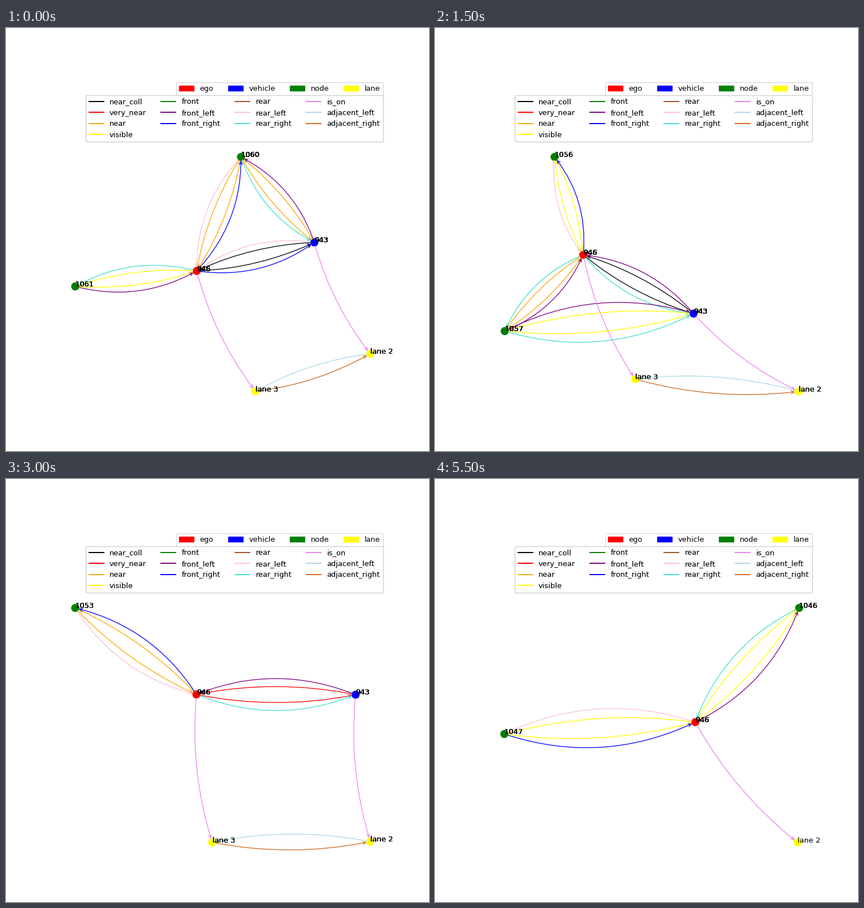
Recreate the animation shown at these times as a matplotlib script. Size 748x748 px, loop 6 s.

```python
import matplotlib.pyplot as plt
from matplotlib.animation import FuncAnimation
from matplotlib.lines import Line2D
from matplotlib.patches import FancyArrowPatch, Patch

SIZE = 748
plt.rcParams["font.family"] = "DejaVu Sans"

NODE_COLORS = {"ego": "red", "vehicle": "blue", "node": "green", "lane": "yellow"}
EDGE_COLORS = {
    "near_coll": "black", "very_near": "red", "near": "orange", "visible": "yellow",
    "front": "green", "front_left": "purple", "front_right": "blue",
    "rear": "sienna", "rear_left": "pink", "rear_right": "turquoise",
    "is_on": "violet", "adjacent_left": "lightblue", "adjacent_right": "chocolate",
}
KINDS = {"ego": "ego", "car": "vehicle", "a": "node", "b": "node",
         "lane 2": "lane", "lane 3": "lane", "lane": "lane"}

# Node positions in pixels, one layout per graph structure.
LAYOUTS = {
    "corner": {"a": (415.5, 228.1), "car": (545.2, 379.2), "ego": (337.2, 429.6),
               "b": (122.4, 457), "lane 2": (644.1, 576), "lane 3": (441.2, 642.6)},
    "triangle": {"a": (169.8, 227.9), "car": (477.3, 345.6), "ego": (122.8, 435.3),
                 "lane 2": (643.7, 553.4), "lane 3": (289.1, 642.7)},
    "hub": {"a": (211.4, 228), "ego": (262.1, 401.2), "car": (457.2, 505),
            "b": (123.3, 536), "lane 3": (354.1, 621), "lane 2": (643.1, 642.6)},
    "chain": {"a": (122.4, 228.1), "ego": (336.7, 381), "car": (618.2, 381.4),
              "lane 3": (364.7, 642.6), "lane 2": (644.1, 641.2)},
    "fork": {"a": (643.9, 228), "ego": (460.2, 430), "b": (122.6, 451), "lane": (641.1, 642.6)},
    "line": {"a": (623.6, 227.8), "ego": (404.9, 435.5), "lane": (143.1, 642.6)},
}

# Relation of the first node to the second, then the way back.
LEFT, RIGHT = ("rear_left", "front_right"), ("front_left", "rear_right")
FACING, BACK = ("front", "rear"), ("rear", "front")


def flip(pair):
    return pair[::-1]


# Each scene: layout, labels, links (from, to, distance, relations).
SCENES = [
    ("corner", {"a": "1060", "b": "1061"}, [
        ("a", "ego", "near", LEFT), ("car", "a", "near", RIGHT),
        ("car", "ego", "near_coll", LEFT), ("b", "ego", "visible", RIGHT)]),
    ("triangle", {"a": "1059"}, [
        ("a", "ego", "very_near", RIGHT), ("car", "a", "near", RIGHT),
        ("car", "ego", "near_coll", RIGHT)]),
    ("triangle", {"a": "1058"}, [
        ("a", "ego", "very_near", RIGHT), ("car", "a", "near", RIGHT),
        ("car", "ego", "near_coll", RIGHT)]),
    ("hub", {"a": "1056", "b": "1057"}, [
        ("a", "ego", "visible", LEFT), ("b", "ego", "near", RIGHT),
        ("car", "ego", "near_coll", RIGHT), ("car", "b", "visible", RIGHT)]),
    ("triangle", {"a": "1055"}, [
        ("a", "ego", "near", LEFT), ("car", "a", "visible", RIGHT),
        ("car", "ego", "near_coll", RIGHT)]),
    ("chain", {"a": "1054"}, [
        ("a", "ego", "very_near", LEFT), ("car", "ego", "very_near", RIGHT)]),
    ("chain", {"a": "1053"}, [
        ("a", "ego", "near", LEFT), ("car", "ego", "very_near", RIGHT)]),
    ("fork", {"a": "1051", "b": "1052", "lane": "lane 3"}, [
        ("a", "ego", "visible", BACK), ("b", "ego", "visible", FACING)]),
    ("fork", {"a": "1050", "b": "1051", "lane": "lane 3"}, [
        ("a", "ego", "visible", BACK), ("b", "ego", "visible", FACING)]),
    ("line", {"a": "1049", "lane": "lane 3"}, [
        ("a", "ego", "very_near", flip(LEFT))]),
    ("fork", {"a": "1047", "b": "1048", "lane": "lane 3"}, [
        ("a", "ego", "visible", flip(RIGHT)), ("b", "ego", "visible", flip(LEFT))]),
    ("fork", {"a": "1046", "b": "1047", "lane": "lane 2"}, [
        ("a", "ego", "visible", flip(RIGHT)), ("b", "ego", "visible", flip(LEFT))]),
]

fig = plt.figure(figsize=(8, 8), dpi=SIZE / 8, facecolor="white")
ax = fig.add_axes([0, 0, 1, 1])
ax.set(xlim=(0, SIZE), ylim=(SIZE, 0))
ax.axis("off")


def add_legend(handles, top):
    legend = ax.legend(handles=handles, ncol=4, loc="upper right", fontsize=10,
                       bbox_to_anchor=(0.9, top), bbox_transform=fig.transFigure)
    legend.set_zorder(5)
    ax.add_artist(legend)


add_legend([Patch(color=c, label=k) for k, c in NODE_COLORS.items()], 0.88)
add_legend([Line2D([], [], color=c, label=k) for k, c in EDGE_COLORS.items()], 0.8492)

drawn = []


def edges_of(layout, links):
    """Yield (start, end, relation, curvature) for every arrow."""
    for start, end, distance, (relation, inverse) in links:
        yield start, end, distance, 0.1
        yield end, start, distance, 0.1
        yield start, end, relation, 0.2
        yield end, start, inverse, 0.2
    if "lane" in layout:
        yield "ego", "lane", "is_on", 0.1
    else:
        yield "ego", "lane 3", "is_on", 0.1
        yield "car", "lane 2", "is_on", 0.1
        yield "lane 2", "lane 3", "adjacent_left", 0.1
        yield "lane 3", "lane 2", "adjacent_right", 0.1


def update(index):
    while drawn:
        drawn.pop().remove()
    name, labels, links = SCENES[index]
    layout = LAYOUTS[name]
    labels = {"ego": "946", "car": "943", **labels}

    xs, ys = zip(*layout.values())
    colors = [NODE_COLORS[KINDS[role]] for role in layout]
    drawn.append(ax.scatter(xs, ys, s=100, c=colors, zorder=2))

    for start, end, relation, rad in edges_of(layout, links):
        arrow = FancyArrowPatch(
            layout[start], layout[end], arrowstyle="->", mutation_scale=10,
            connectionstyle=f"arc3,rad={rad}", shrinkA=5, shrinkB=5,
            color=EDGE_COLORS[relation], linewidth=1, zorder=3)
        drawn.append(ax.add_patch(arrow))
        # A label is repeated for each arrow, which thickens its strokes.
        for role in (start, end):
            drawn.append(ax.text(*layout[role], labels.get(role, role),
                                 fontsize=10, zorder=4))
    return drawn


anim = FuncAnimation(fig, update, frames=len(SCENES), init_func=lambda: update(0),
                     interval=500, repeat=True, repeat_delay=0, blit=False)
plt.show()
```
